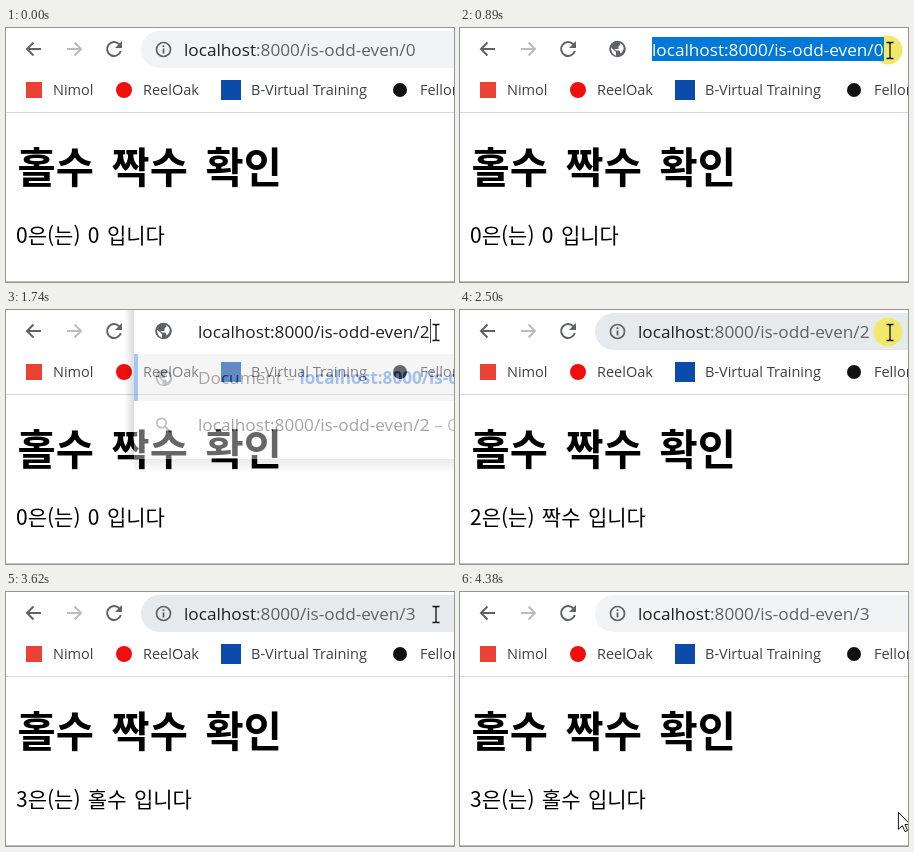
Animation, 448 px wide and 254 px high, one loop 4.66 s. Source, as an HTML page:

```html
<!DOCTYPE html>
<html lang="ko">
<head>
<meta charset="utf-8">
<style>
html, body { margin: 0; width: 100%; height: 100%; overflow: hidden; background: #fff; }
svg { display: block; width: 448px; height: 254px; }
text { white-space: pre; font-family: "Open Sans", "Noto Sans", sans-serif; }
.url { font-size: 17.2px; fill: #5f6368; }
.dark { fill: #202124; }
.typed { fill: #202124; }
.picked { fill: #fff; }
.mark { font-size: 14.5px; fill: #3c4043; }
.ko { font-family: "Noto Sans CJK KR", "Noto Sans KR", "Noto Sans CJK", "Noto Sans CJK SC", sans-serif; }
.line { fill: none; stroke: #5f6368; stroke-width: 2; }
</style>
</head>
<body>
<svg viewBox="0 0 448 254">
  <defs>
    <g id="globe">
      <circle r="8.3" fill="#5f6368"/>
      <path d="M-6.5 -1.5L-1.5 3V6.7Q-6.5 5 -6.5 -1.5ZM-1 -6.5Q3 -6.5 3 -4.5L1 -2.5V0H-3L-1.5 1.5H2L3 4.5Q7.5 1 5.5 -3.5Q3 -6.5 -1 -6.5Z" fill="#fff"/>
    </g>
    <linearGradient id="below" x2="0" y2="1">
      <stop stop-opacity=".22"/><stop offset="1" stop-opacity="0"/>
    </linearGradient>
    <linearGradient id="beside" x1="1" x2="0">
      <stop stop-opacity=".14"/><stop offset="1" stop-opacity="0"/>
    </linearGradient>
  </defs>

  <!-- page -->
  <text class="ko" x="11.5" y="155" font-size="41.5" font-weight="700" word-spacing="6">홀수 짝수 확인</text>
  <text class="ko" id="body" x="10" y="215" font-size="21" font-weight="350" word-spacing="1.5"></text>
  <path d="M0 253.5H448" stroke="#bdbdbd"/>

  <!-- bookmarks -->
  <path d="M0 84.5H448" stroke="#d5d7da"/>
  <rect x="20" y="54" width="16" height="16" fill="#ea4335"/>
  <circle cx="118" cy="62" r="8" fill="#f00f0f"/>
  <rect x="215" y="52" width="20" height="20" fill="#0b4cab"/>
  <circle cx="394" cy="62" r="7" fill="#111"/>
  <g class="mark">
    <text x="47" y="67">Nimol</text>
    <text x="137" y="67">ReelOak</text>
    <text x="245" y="67">B-Virtual Training</text>
    <text x="414" y="67">Fellor</text>
  </g>

  <!-- toolbar -->
  <path class="line" d="M35 21H21M27.5 14.5L21 21L27.5 27.5"/>
  <path class="line" style="stroke:#babcbe" d="M61 21H75M68.5 14.5L75 21L68.5 27.5"/>
  <path class="line" d="M113.2 16.2A7 7 0 1 0 114.8 23"/>
  <path d="M116 13V20H109Z" fill="#5f6368"/>
  <rect id="pill" x="135" y="3" width="340" height="37" rx="18.5"/>

  <g id="popup">
    <path d="M118 0H128V149H118Z" fill="url(#beside)"/>
    <g id="rows">
      <path d="M128 149H470V163H128Z" fill="url(#below)"/>
      <path d="M128 44H470V149H128Z" fill="#fff"/>
      <path d="M128 44H470V91H128Z" fill="#e8e8e9"/>
      <path d="M128 44H132V91H128Z" fill="#1a73e8"/>
      <use href="#globe" x="158" y="68"/>
      <g class="line" style="stroke-width:1.8"><circle cx="155.5" cy="113" r="4.6"/><path d="M159 116.5L165 122.5"/></g>
      <text class="url" x="192" y="74"><tspan class="dark">Document</tspan> – <tspan font-weight="700" fill="#1a5fd0">localhost:8000/is-odd-even</tspan></text>
      <text class="url" x="192" y="121"><tspan class="dark" id="query"></tspan> – O</text>
    </g>
    <path d="M128 -10H470V44H128Z" fill="#fff"/>
  </g>

  <g id="info">
    <circle class="line" cx="157.5" cy="21.5" r="7" style="stroke-width:1.7"/>
    <path d="M157.5 20.5V25.5M157.5 17.3V19" stroke="#5f6368" stroke-width="1.8"/>
  </g>
  <use id="site" href="#globe" x="157.5" y="21"/>
  <circle id="click" cx="428" cy="22" r="14.5" fill="#f0e96d"/>
  <path id="select" fill="#0078d7"/>
  <text class="url" id="url" y="27.5"><tspan id="host">localhost</tspan><tspan id="path">:8000/is-odd-even/</tspan><tspan id="digit"></tspan></text>
  <path id="caret" d="M424.5 9V33" stroke="#444"/>

  <g id="cursor">
    <path id="beam" d="M-3.5 -7.5H-1L0 -6.5L1 -7.5H3.5M0 -6.5V7.5M-3.5 8.5H-1L0 7.5L1 8.5H3.5" fill="none" stroke="#111" stroke-width="1.3"/>
    <path id="arrow" d="M0 0V17L4 13.3L6.6 19.3L9.2 18.2L6.6 12.3H12Z" fill="#fff" stroke="#111"/>
  </g>
</svg>
<script>
const LOOP = 4660, STEP = 70;
const el = id => document.getElementById(id);
const set = (id, attrs) => { for (const k in attrs) el(id).setAttribute(k, attrs[k]); };
const show = (id, on) => { el(id).style.display = on ? "" : "none"; };

// Each visit: click the address, type a digit, see suggestions, press enter.
const visits = [
  { from: 0, to: 2, click: 760, calm: 960, type: 1390, suggest: 1460, enter: 1740 },
  { from: 2, to: 3, click: 2500, calm: 2780, type: 3130, suggest: 3130, enter: 3490 }
];

const answer = n => n === 0 ? "0" : n % 2 ? "홀수" : "짝수";

// Suggestions fade in over two steps and out within one.
function popupOpacity(t, { suggest, enter }) {
  if (t < suggest || t >= enter + STEP) return 0;
  if (t >= enter) return .4;
  return Math.min(1, .63 * (1 + Math.floor((t - suggest) / STEP)));
}

// Distance of the pointer from its resting place: 1 is off stage.
function pointerAway(t) {
  const now = Math.floor((t + 8) / STEP) * STEP;
  const coming = Math.max(0, 1 - now / 620);
  const leaving = Math.min(1, Math.max(0, (now - 3900) / 480));
  return Math.max(coming, leaving) ** 2;
}

function draw(t) {
  const visit = visits.findLast(v => v.click <= t) || visits[0];
  const { from, to, click, calm, type, enter } = visit;
  const loaded = t >= enter + STEP;
  const focus = t >= click + STEP && !loaded;
  const all = focus && t < click + 2 * STEP;
  const last = focus && t < type;
  const popup = popupOpacity(t, visit);
  const number = t < type ? from : to, page = loaded ? to : from;

  el("body").textContent = `${page}은(는) ${answer(page)} 입니다`;
  el("digit").textContent = number;
  el("query").textContent = "localhost:8000/is-odd-even/" + number;

  const away = pointerAway(t), y = 22 + 236 * away, hover = y < 40;
  const ink = popup ? "typed" : "";
  set("pill", { fill: focus ? "#fff" : hover ? "#e7eaec" : "#f1f3f4" });
  set("url", { x: focus ? 192 : 178 });
  set("host", { class: all ? "picked" : "dark" });
  set("path", { class: all ? "picked" : ink });
  set("digit", { class: last ? "picked" : ink });
  set("select", { d: `M${all ? 192 : 414} 9H424V33H${all ? 192 : 414}Z` });
  show("select", last);
  show("caret", focus && !last);
  show("info", !focus);
  show("site", focus);
  show("click", t >= click && t < calm);
  show("popup", popup);
  set("rows", { opacity: popup });

  show("cursor", away < 1);
  set("cursor", { transform: `translate(${430 + 10 * away} ${y})` });
  show("beam", hover);
  show("arrow", !hover);
}

const start = performance.now();
function tick() {
  draw((performance.now() - start) % LOOP);
  requestAnimationFrame(tick);
}
tick();
</script>
</body>
</html>
```
